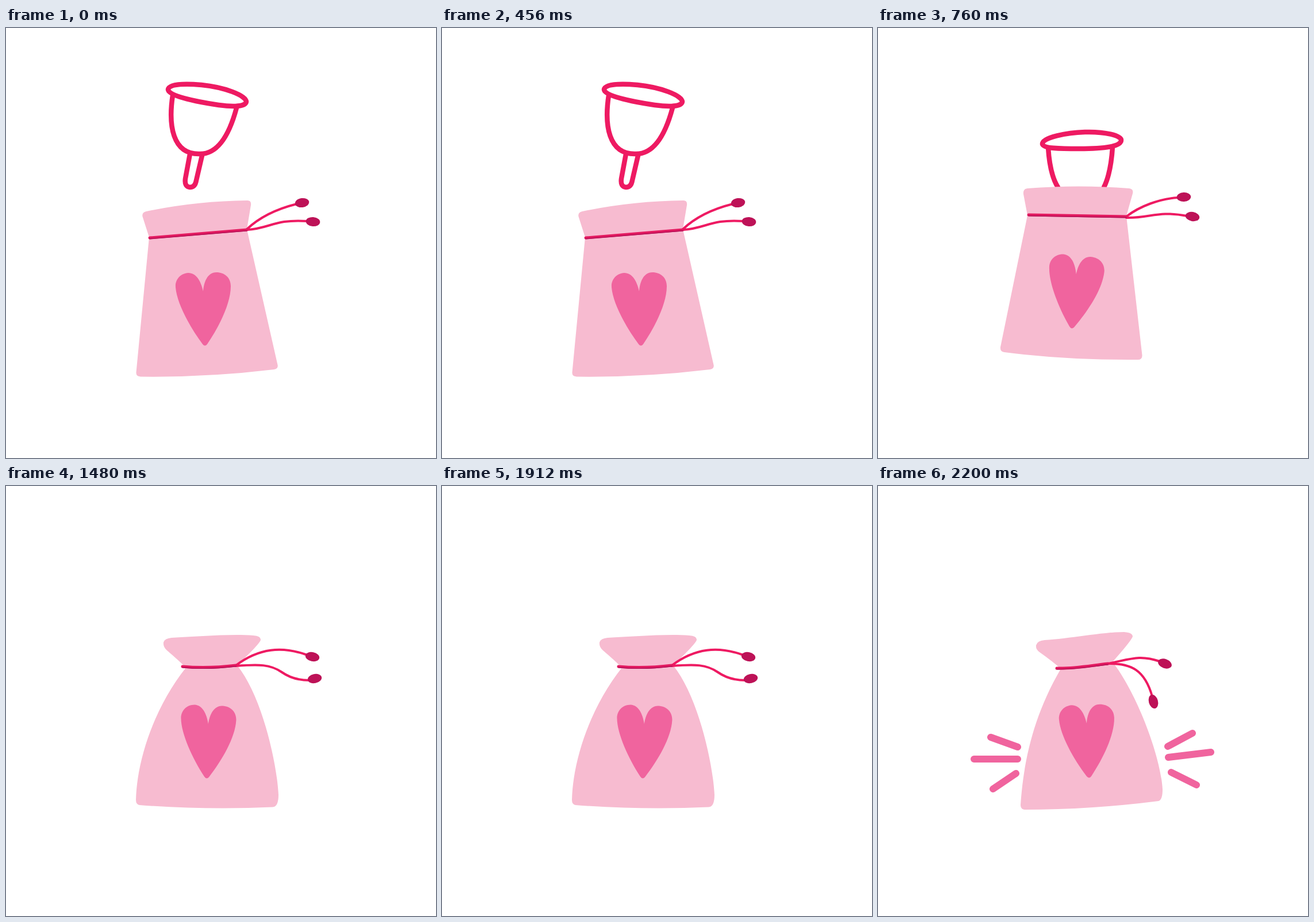
Recreate the animation shown at these times as an HTML page. Size 748 by 748 pixels, loop 2880 ms.

```html
<!DOCTYPE html>
<html lang="en">
<head>
<meta charset="utf-8">
<title>Cup and pouch</title>
<style>
  html, body { margin: 0; width: 100%; height: 100%; overflow: hidden; background: #fff; }
  svg { display: block; width: 100%; height: 100%; }
  path { fill: none; stroke-linecap: round; stroke-linejoin: round; }
  .bag { fill: #f7bbd0; }
  .heart { fill: #f0649e; }
  .cup { stroke: #ee1a62; stroke-width: 8.5; }
  .cord { stroke: #ee1a62; stroke-width: 4; }
  .neck { stroke: #e31a60; stroke-width: 5; }
  .shade { stroke: #b81158; stroke-width: 1.6; }
  .bead { fill: #bd1257; }
  .rays { stroke: #f0649e; stroke-width: 12; }
</style>
</head>
<body>
<svg id="stage" viewBox="0 0 748 748"></svg>
<script>
const LOOP = 2880;

// Heart outline with its tip at the origin
const HEART = 'M-3-94C-7-112-15-126-29-126C-43-125-52-114-51-101C-49-74-27-33-4-2' +
  'Q0 3 4-2C25-33 45-73 45-103C45-118 34-127 20-127C4-127-2-109-3-94Z';

// heart: x, y, angle; beads: x, y, angle
const poses = [
  {
    start: 0,
    cup: 'M282 107C283 96 318 97 340 99C380 103 417 117 418 128C417 139 385 136 370 134C330 128 281 118 282 107Z' +
      'M290 117C282 170 290 219 335 219C371 221 390 180 401 139' +
      'M320 219L312 262Q310 276 320 277Q329 277 331 265L341 222',
    bag: 'M244 319Q330 301 420 300Q427 300 426 308L419 350L472.5 586Q474 593 466 594' +
      'Q350 608 234 606.5Q226 606 226.5 599L249 364L237.5 328Q236 321 244 319Z',
    heart: [346, 552, 0],
    neck: 'M250 365L419 351',
    cords: 'M419 350C440 330 470 315 506 306M419 351C460 349 465 332 525 336',
    beads: [[515, 304, -8], [534, 337, 5]]
  },
  {
    start: 760,
    cup: 'M286 202C285 190 330 182 360 181C395 180 423 187 423 195C423 206 395 210 350 210C318 210 288 210 286 202Z' +
      'M296 208Q299 255 313 277M408 207Q405 253 393 277',
    bag: 'M260 279Q350 272 437 279Q445 280 443 288L432 327L459.5 569Q460 577 452 577' +
      'Q330 578 220 564Q212 563 213 555L260 326L253 289Q252 280 260 279Z',
    heart: [337, 522, 6.6],
    neck: 'M262 325L432 328',
    cords: 'M432 328C455 310 490 297 522 295M432 330C475 331 485 317 538 327',
    beads: [[532, 294, -3], [547, 328, 10]]
  },
  {
    start: 1480,
    bag: 'M288 264C330 262 390 257 430 260Q444 261 443 268Q441 275 402 312C445 365 471 480 474 537' +
      'Q474 558 464 558.5Q350 564 232 555Q226 554 226 546C228 470 262 380 313 316' +
      'Q300 303 280 286Q273 280 274 272Q276 265 288 264Z',
    heart: [349, 508, 3.6],
    neck: 'M307 314Q350 318 400 312',
    cords: 'M400 312C440 282 480 278 524 294M400 313C440 310 460 310 480 324Q500 338 528 338',
    beads: [[533, 297, 12], [537, 335, -12]]
  },
  {
    start: 2200,
    bag: 'M290 268C330 266 390 254 428 254Q443 255 443 262Q440 270 408 306C450 360 492 470 495 528' +
      'Q495 546 488 548Q370 563 255 563Q248 562 248 555C253 480 270 400 318 318' +
      'Q305 306 281 289Q274 284 275 277Q277 269 290 268Z',
    heart: [367, 507, -0.6],
    neck: 'M311 317C340 318 365 313 400 309',
    cords: 'M400 309C440 301 455 293 490 305M400 309C440 308 464 320 477 366',
    beads: [[499, 309, 20], [479, 375, 75]],
    rays: 'M196 437L243 454M167 475H243M200 527L240 500M504 453L547 430M505 472L579 463M510 498L554 520'
  }
];

const path = (name, d, extra = '') => d ? `<path class="${name}" d="${d}" ${extra}/>` : '';
const place = ([x, y, angle]) => `transform="translate(${x} ${y}) rotate(${angle})"`;
const bead = at => `<ellipse class="bead" rx="12.3" ry="8" ${place(at)}/>`;

const draw = p => '<g>' +
  path('cup', p.cup) +
  path('bag', p.bag) +
  path('heart', HEART, place(p.heart)) +
  path('cord', p.cords) +
  path('neck', p.neck) +
  path('shade', p.neck, 'transform="translate(0 1.6)"') +
  p.beads.map(bead).join('') +
  path('rays', p.rays) + '</g>';

const stage = document.getElementById('stage');
stage.innerHTML = poses.map(draw).join('');
const groups = [...stage.children];

function render() {
  const time = performance.now() % LOOP;
  const current = poses.filter(p => p.start <= time).length - 1;
  groups.forEach((g, i) => g.style.display = i === current ? '' : 'none');
  requestAnimationFrame(render);
}
render();
</script>
</body>
</html>
```
